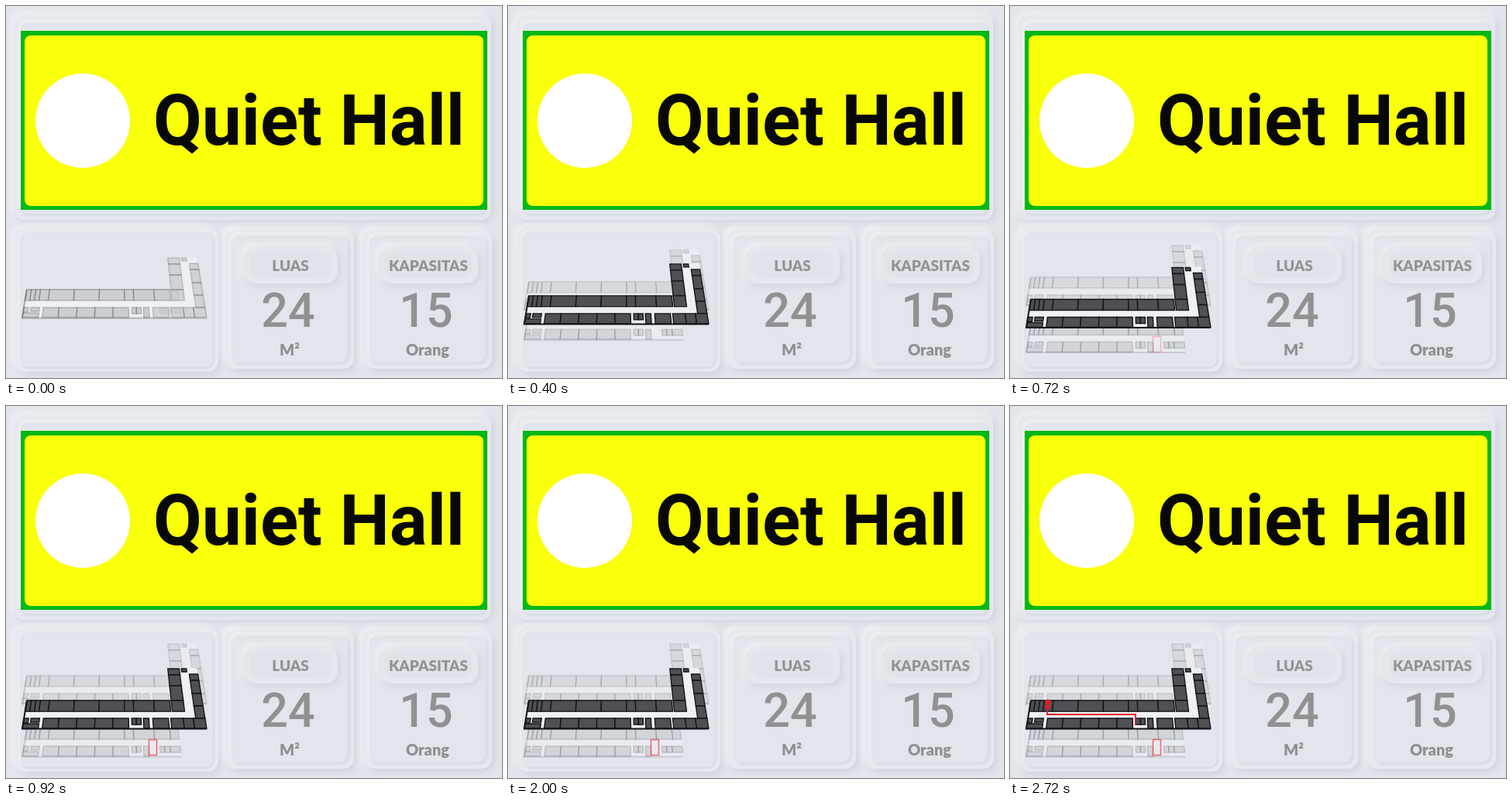
Write an HTML page with a canvas that moves like this. It is 640 by 480 pixels and loops after 5120 ms.

```html
<!DOCTYPE html>
<html lang="id">
<head>
<meta charset="utf-8">
<title>Quiet Hall</title>
<style>
  html, body { margin: 0; width: 100%; height: 100%; overflow: hidden; background: #e2e5eb; }
  canvas { display: block; }
</style>
</head>
<body>
<canvas id="stage" width="640" height="480"></canvas>
<script>
const W = 640, H = 480, LOOP = 5120, STEP = 40;
const ctx = document.getElementById('stage').getContext('2d');
const clamp = v => Math.max(0, Math.min(1, v));
const span = (t, from, to) => clamp((t - from) / (to - from));

// ---- static board ----
function box(c, x0, y0, x1, y1, r) {
  c.beginPath();
  c.roundRect(x0, y0, x1 - x0, y1 - y0, r);
}

function raised(c, x0, y0, x1, y1, r, depth, fill) {
  for (const [dir, color] of [[-1, '#f3f5f8'], [1, '#cfd3db']]) {
    c.save();
    c.shadowColor = color;
    c.shadowBlur = depth * 1.6;
    c.shadowOffsetX = c.shadowOffsetY = dir * depth * 0.6;
    c.fillStyle = fill;
    box(c, x0, y0, x1, y1, r);
    c.fill();
    c.restore();
  }
}

function label(c, text, x, y, font, color, align = 'center') {
  c.font = font;
  c.fillStyle = color;
  c.textAlign = align;
  c.fillText(text, x, y);
}

function card(c, cx, x0, x1, title, value, unit) {
  raised(c, x0, 288, x1, 468, 14, 6, '#e7e9ee');
  raised(c, x0 + 8, 296, x1 - 8, 460, 10, 3, '#e2e5eb');
  const half = title.length > 5 ? 64 : 61;
  raised(c, cx - half, 311, cx + half, 358, 15, 5, '#e4e7ec');
  box(c, cx - half + 8, 317, cx + half - 8, 351, 13);
  c.fillStyle = '#e0e3e9';
  c.fill();
  label(c, title, cx, 342, '900 19px Lato, sans-serif', '#929394');
  label(c, value, cx - 3, 414, '500 61px Roboto, sans-serif', '#919191');
  label(c, unit, cx - 1, 451, '900 20px Lato, sans-serif', '#8e8f90');
}

function makeBoard() {
  const board = document.createElement('canvas');
  board.width = W;
  board.height = H;
  const c = board.getContext('2d');
  c.fillStyle = '#e2e5eb';
  c.fillRect(0, 0, W, H);

  raised(c, 11, 12, 626, 276, 12, 6, '#e6e8ee');
  raised(c, 19, 22, 618, 268, 8, 3, '#e2e5eb');
  raised(c, 12, 286, 274, 472, 14, 6, '#e7e9ee');
  raised(c, 18, 291, 267, 466, 10, 2, '#e2e5eb');
  card(c, 367, 283, 449, 'LUAS', '24', 'M²');
  card(c, 545, 461, 627, 'KAPASITAS', '15', 'Orang');

  c.fillStyle = '#00b813';
  c.fillRect(19, 32, 602, 231);
  c.fillStyle = '#faff0a';
  box(c, 24, 38, 616, 258, 8);
  c.fill();
  c.fillStyle = '#fff';
  c.beginPath();
  c.arc(99, 148, 61, 0, Math.PI * 2);
  c.fill();
  label(c, 'Quiet Hall', 190, 179, '700 91px Roboto, sans-serif', '#080808', 'left');
  return board;
}

// ---- floor plan ----
const project = (x, y) => [140 + (x - 140) * (1 + (y - 398) * 0.0014), y];

function shape(points) {
  ctx.beginPath();
  for (const [x, y] of points) ctx.lineTo(...project(x, y));
  ctx.closePath();
}

function room(x0, y0, x1, y1) {
  shape([[x0, y0], [x1, y0], [x1, y1], [x0, y1]]);
  ctx.fill();
  ctx.stroke();
}

function row(xs, y0, y1) {
  for (let i = 1; i < xs.length; i++) room(xs[i - 1], y0, xs[i], y1);
}

function column(ys, x0, x1) {
  for (let i = 1; i < ys.length; i++) room(x0, ys[i - 1], x1, ys[i]);
}

const TOP = [24, 30, 36, 42, 54, 87, 120, 153, 165, 192, 213];
const BOTTOM = [49, 69, 92, 115, 138, 158];

function floor(dy, alpha, arm) {
  ctx.save();
  ctx.translate(0, dy);

  const end = arm ? 256 : 224;
  ctx.globalAlpha = Math.min(0.92, alpha * 3.5);
  ctx.fillStyle = '#f0f2f7';
  shape(arm
    ? [[24, 380], [214, 380], [215, 338], [256, 338], [256, 417], [24, 417]]
    : [[24, 380], [end, 380], [end, 417], [24, 417]]);
  ctx.fill();

  ctx.globalAlpha = alpha;
  ctx.fillStyle = '#505053';
  ctx.strokeStyle = '#11151b';
  ctx.lineWidth = 1.4;
  row(TOP, 380, 394);
  row(BOTTOM, 403, 416);
  room(24, 403, 30, 409);
  room(24, 410, 44, 416);
  room(33, 403, 44, 408);
  row([162, 168, 174], 403, 411);
  room(177, 403, 184, 416);
  if (arm) {
    column([339, 347, 361, 380, 394], 215, 231);
    column([346, 354, 371, 387, 403], 244, 256);
    row([189, 209], 403, 416);
    row([212, 228, 241, 256], 403, 416);
    room(234, 339, 241, 343);
  } else {
    row([198, 204, 211, 224], 403, 411);
    room(213, 380, 224, 394);
  }
  ctx.lineWidth = 2;
  shape([[24, 380], [24, 416], [end, 416]]);
  ctx.beginPath();
  ctx.moveTo(...project(24, 380));
  ctx.lineTo(...project(24, 416.5));
  ctx.lineTo(...project(end, 416.5));
  ctx.stroke();
  ctx.restore();
}

// ---- route ----
const ROUTE = [[48, 385], [48, 398], [162, 398], [162, 412]];

function drawRoute(p) {
  if (p <= 0) return;
  ctx.strokeStyle = ctx.fillStyle = '#e5192b';
  ctx.lineWidth = 1.8;
  let left = p * 141;
  ctx.beginPath();
  ctx.moveTo(...ROUTE[0]);
  for (let i = 1; i < ROUTE.length && left > 0; i++) {
    const [ax, ay] = ROUTE[i - 1], [bx, by] = ROUTE[i];
    const len = Math.hypot(bx - ax, by - ay);
    const k = Math.min(1, left / len);
    ctx.lineTo(ax + (bx - ax) * k, ay + (by - ay) * k);
    left -= len;
  }
  ctx.stroke();
  ctx.beginPath();
  ctx.arc(49, 382, 3.4, 0, Math.PI * 2);
  ctx.fill();
  ctx.fillRect(46, 386, 6, 4);
}

const board = makeBoard();

function render(t) {
  ctx.drawImage(board, 0, 0);
  const open = 1 - Math.pow(1 - span(t, 0, 920), 1.45);
  floor(-14 + 50 * open, 0.15, false);

  ctx.globalAlpha = 0.75 * span(t, 580, 900);
  ctx.strokeStyle = '#ee4353';
  ctx.lineWidth = 1.6;
  ctx.strokeRect(184.5, 394.5 + 36 * open, 10, 20);
  ctx.globalAlpha = 1;

  floor(-14 - 18 * open, 0.12, true);
  floor(-14 + 14 * open, 0.12 + 0.88 * span(t, 0, 240), true);
  drawRoute(span(t, 2000, 2720));
}

const start = performance.now();
function tick() {
  const t = (performance.now() - start) % LOOP;
  render(Math.floor(t / STEP) * STEP);
  requestAnimationFrame(tick);
}
tick();
</script>
</body>
</html>
```
